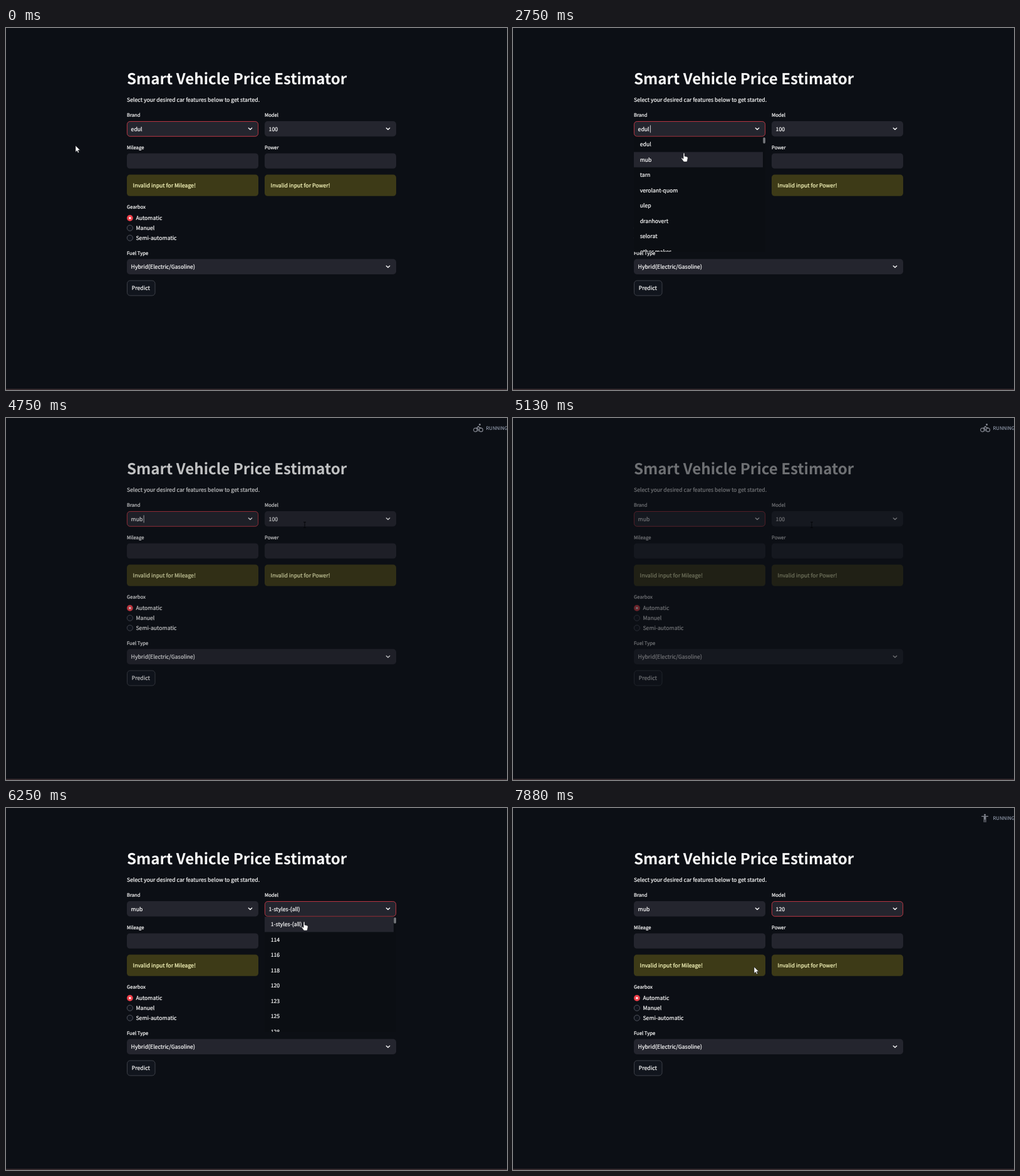
Animation, 800 px wide and 579 px high, one loop 8 s. Source, as an HTML page:

```html
<!DOCTYPE html>
<html lang="en">
<head>
<meta charset="utf-8">
<title>Smart Vehicle Price Estimator</title>
<style>
  html, body { margin: 0; width: 100%; height: 100%; overflow: hidden; background: #0c0f15; }
  svg { display: block; width: 100vw; height: 100vh; }
  text {
    font: 400 8.73px "Noto Sans CJK JP", "Noto Sans CJK SC", "Noto Sans", sans-serif;
    color: #fafafa; fill: currentColor; stroke: currentColor; stroke-width: .22;
    text-rendering: geometricPrecision; white-space: pre;
  }
  .title { font-weight: 700; font-size: 24.13px; stroke: none; }
  .label { font-size: 7.66px; }
  .warning { color: #ffffc2; }
  .status { color: #a9b3c6; stroke: none; }
  .field, .hover { fill: #24252e; }
  .notice { fill: #3d3a17; }
  .button { fill: #11151d; stroke: #3d4048; }
  .radio { fill: #11151d; stroke: #50535d; }
  .focus { fill: none; stroke: #b73541; }
  .chevron { fill: none; stroke: #fafafa; stroke-width: 1.4; stroke-linecap: round; stroke-linejoin: round; }
  .caret { fill: #fafafa; }
  .sport { fill: none; stroke: #858892; stroke-width: 1.2; stroke-linecap: round; stroke-linejoin: round; }
  .sport .head { fill: #858892; stroke: none; }
  .white { fill: #fff; stroke: #15171c; stroke-width: .6; }
</style>
</head>
<body>
<svg id="stage" viewBox="0 0 800 579"></svg>
<script>
const LEFT = 193, RIGHT = 413, COLUMN = 210, LIST_TOP = 173.6, ROW = 24.45;
const BRANDS = ['edul', 'mub', 'tarn', 'verolant-quom', 'ulep', 'dranhovert', 'selorat', 'other makes'];
const MODELS = ['1-styles-(all)', '114', '116', '118', '120', '123', '125', '128'];

// Moments of the story, in ms
const LOOP = 8000, TICK = 125;
const BRAND_OPEN = 2050, BRAND_PICK = 3625, RERUN = 4000, RERUN_END = 5200;
const MODEL_FOCUS = 5625, MODEL_OPEN = 5850, MODEL_PICK = 7125, SECOND_RERUN = 7625;
const BLINK_STARTS = [250, 1375, BRAND_PICK, MODEL_FOCUS, MODEL_PICK];

// Pointer path: time, x, y, shape used from that time on
const POINTER = [
  [0, 111, 188, 'arrow'], [500, 111, 188, 'arrow'], [750, 37, 172, 'arrow'], [875, 48, 149, 'arrow'],
  [1000, 48, 149, 'arrow'], [1125, 80, 148, 'arrow'], [1250, 80, 148, 'arrow'], [1375, 317, 157, 'beam'],
  [2250, 310, 160, 'beam'], [2500, 285, 192, 'hand'], [2625, 276, 201, 'hand'], [2750, 273, 200, 'hand'],
  [3000, 273, 203, 'hand'], [3375, 274, 211, 'hand'], [3750, 274, 211, 'beam'], [4000, 290, 208, 'beam'],
  [4500, 477, 171, 'beam'], [6000, 477, 171, 'beam'], [6250, 476, 182, 'hand'], [6625, 474, 230, 'hand'],
  [6750, 473, 256, 'hand'], [6875, 472, 273, 'hand'], [7125, 472, 282, 'hand'], [7250, 465, 282, 'arrow'],
  [7750, 385, 254, 'arrow'], [LOOP, 385, 254, 'arrow']
];

const text = (x, y, content, cls = '', id = '') =>
  `<text x="${x}" y="${y}" class="${cls}" id="${id}">${content}</text>`;
const box = (x, y, w, h, cls, id = '') =>
  `<rect x="${x}" y="${y}" width="${w}" height="${h}" rx="4.8" class="${cls}" id="${id}"/>`;
const chevron = (x, y) => `<path class="chevron" d="M${x - 2.7} ${y - 1.4}l2.7 2.7 2.7-2.7"/>`;

const select = (name, x, label) =>
  text(x, 142.4, label, 'label') + box(x, 149, COLUMN, 24.4, 'field') +
  box(x + .4, 149.5, COLUMN - .8, 23.8, 'focus', name + 'Focus') +
  text(x + 6.6, 164.8, '', '', name + 'Value') + chevron(x + 197, 161.3);

const numberInput = (x, label) =>
  text(x, 193.5, label, 'label') + box(x, 200.4, COLUMN, 24.4, 'field') +
  box(x, 234.6, COLUMN, 34.2, 'notice') + text(x + 9.6, 255.3, `Invalid input for ${label}!`, 'warning');

const radio = (name, i) => {
  const y = 304 + i * 15.9;
  return (i ? `<circle cx="197.9" cy="${y}" r="4.6" class="radio"/>`
            : `<circle cx="197.9" cy="${y}" r="4.9" fill="#ef404a"/><circle cx="197.9" cy="${y}" r="1.8" fill="#fff"/>`) +
    text(207.4, y + 3.3, name);
};

const list = (name, x, items) =>
  `<g id="${name}List" clip-path="url(#listArea)">
    <rect x="${x}" y="${LIST_TOP}" width="${COLUMN}" height="184.4" fill="#0b0e13"/>
    <rect x="${x}" width="206" height="${ROW}" class="hover" id="${name}Hover"/>
    <rect x="${x + 206.3}" y="175" width="3.6" height="9.8" rx="1.8" fill="#75777c"/>
    ${items.map((item, i) => text(x + 9.7, 189.4 + i * ROW, item)).join('')}
  </g>`;

const sport = (d, headX, headY) =>
  `<g class="sport"><circle class="head" cx="${headX}" cy="${headY}" r="1.5"/><path d="${d}"/></g>`;
const SPORTS = [
  sport('M748.5 13.3h10M752.3 13.5v8.8M754.8 13.5v8.8M753.5 13.5v4.5', 753.5, 11),
  sport('M749 15.5l3-2 3 1 1.5 2.3h2.5M753.5 14l-1.2 4 2.7 1.5v3.3M752 18l-1 2.5-3.5-.5', 756, 11),
  sport('M746.6 19a2.9 2.9 0 1 0 5.8 0a2.9 2.9 0 1 0-5.8 0M755.6 19a2.9 2.9 0 1 0 5.8 0a2.9 2.9 0 1 0-5.8 0' +
        'M754 20.8v-3l-2.2-2 2.6-2.5 1.8 2.2h2.4', 756.5, 10.6)
];

stage.innerHTML =
  `<defs><clipPath id="listArea"><rect x="190" y="${LIST_TOP}" width="440" height="184.4"/></clipPath></defs>
  <rect y="577" width="800" height="2" fill="#34292d"/>
  <g id="page">` +
    text(LEFT, 90, 'Smart Vehicle Price Estimator', 'title') +
    text(LEFT, 118, 'Select your desired car features below to get started.') +
    select('brand', LEFT, 'Brand') + select('model', RIGHT, 'Model') +
    numberInput(LEFT, 'Mileage') + numberInput(RIGHT, 'Power') +
    text(LEFT, 289, 'Gearbox', 'label') + ['Automatic', 'Manuel', 'Semi-automatic'].map(radio).join('') +
    text(LEFT, 362.8, 'Fuel Type', 'label') + box(LEFT, 369.6, 430, 24.4, 'field') +
    text(199.6, 385.4, 'Hybrid(Electric/Gasoline)') + chevron(610, 381.8) +
    box(193.5, 404, 44.5, 24, 'button') + text(200.7, 419, 'Predict') +
    `<rect id="caret" class="caret" y="155.5" width=".8" height="12"/>
  </g>` +
  list('brand', LEFT, BRANDS) + list('model', RIGHT, MODELS) +
  `<g id="running"><g id="sports">${SPORTS.join('')}</g>` +
    text(766.5, 18.8, 'RUNNING...', 'label status') +
  `</g>
  <g id="pointer">
    <path id="arrow" class="white" d="M0 0v10.4l2.4-2.2 1.6 3.6 1.7-.7-1.6-3.5h3.3z"/>
    <path id="beam" fill="none" stroke="#05060a" d="M-2-4.5h4M0-4.5v9M-2 4.5h4"/>
    <path id="hand" class="white" d="M-1 1q0-1.3 1-1.3t1 1.3v4l4 1q1.4.5 1.2 2l-.8 4q-.3 2-1.2 2h-4.5l-3.7-5q-.5-1 .5-1.4l2.5 1.7z"/>
  </g>`;

const el = id => document.getElementById(id);
const show = (node, visible) => { node.style.display = visible ? '' : 'none'; };
const ramp = (t, from, to) => Math.min(1, Math.max(0, (t - from) / (to - from)));

function pointerAt(t) {
  const i = Math.max(0, POINTER.findLastIndex(key => key[0] <= t));
  const [from, x, y, shape] = POINTER[i];
  const [to, nextX, nextY] = POINTER[i + 1] || POINTER[i];
  const p = to > from ? ramp(t, from, to) : 0;
  return { x: x + (nextX - x) * p, y: y + (nextY - y) * p, shape };
}

function drawList(name, t, open, pick) {
  const opacity = ramp(t, open, open + 250) * (1 - ramp(t, pick, pick + 200));
  const row = Math.max(0, Math.floor((pointerAt(Math.min(t, pick) - TICK).y - LIST_TOP) / ROW));
  el(name + 'List').style.opacity = opacity;
  el(name + 'Hover').setAttribute('y', LIST_TOP + .3 + row * ROW);
}

function draw(time) {
  // The picture advances eight times a second
  const t = Math.floor((time % LOOP + 6) / TICK) * TICK;

  el('brandValue').textContent = t < BRAND_PICK ? BRANDS[0] : BRANDS[1];
  el('modelValue').textContent = t < RERUN_END ? '100' : t < MODEL_PICK ? MODELS[0] : MODELS[4];
  const focus = ramp(t, MODEL_FOCUS, MODEL_FOCUS + 250);
  el('brandFocus').style.opacity = 1 - focus;
  el('modelFocus').style.opacity = focus;

  const value = el(t < MODEL_FOCUS ? 'brandValue' : 'modelValue');
  const blinkStart = BLINK_STARTS.findLast(start => start <= t) ?? BLINK_STARTS[0];
  el('caret').setAttribute('x', +value.getAttribute('x') + value.getComputedTextLength() + 1.3);
  show(el('caret'), Math.floor((t - blinkStart) / 500) % 2 === 0);

  const stale = ramp(t, 4200, RERUN_END) ** 1.7 * (1 - ramp(t, RERUN_END, RERUN_END + 250));
  el('page').style.opacity = 1 - .67 * stale;

  drawList('brand', t, BRAND_OPEN, BRAND_PICK);
  drawList('model', t, MODEL_OPEN, MODEL_PICK);

  show(el('running'), (t >= RERUN && t < RERUN_END) || t >= SECOND_RERUN);
  [...el('sports').children].forEach((icon, i) => show(icon, i === t / TICK % SPORTS.length));

  const { x, y, shape } = pointerAt(t);
  el('pointer').setAttribute('transform', `translate(${x} ${y})`);
  for (const node of el('pointer').children) show(node, node.id === shape);
}

const start = performance.now();
function frame() {
  draw(performance.now() - start);
  requestAnimationFrame(frame);
}
frame();
</script>
</body>
</html>
```
